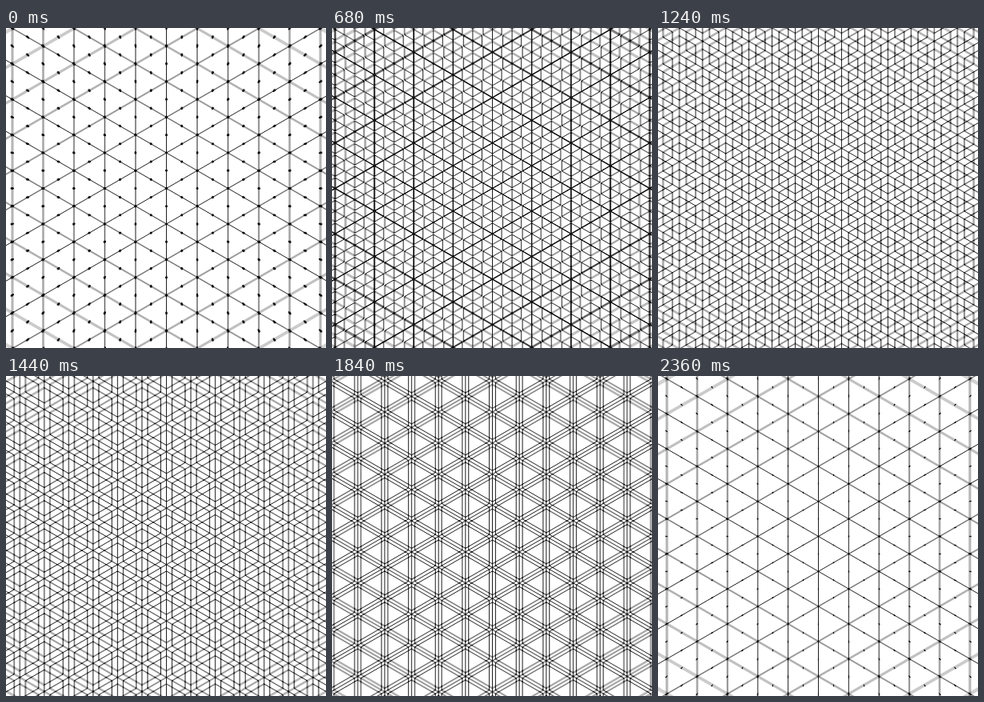
These frames come from a looping animation (400x400 px, 2400 ms). An HTML page with a canvas:

```html
<!DOCTYPE html>
<html lang="en">
<head>
<meta charset="utf-8">
<title>Triangle grid</title>
<style>
  html, body { margin: 0; width: 100%; height: 100%; overflow: hidden; background: #fff; }
  canvas { display: block; }
</style>
</head>
<body>
<canvas id="stage" width="400" height="400"></canvas>
<script>
const SIZE = 400, LOOP = 2400, STEPS = 60;
const CENTER = SIZE / 2 + 0.5;    // on a pixel centre, so the middle line is crisp
const EDGE = 43.42;               // grid edge at the start of the loop
const SAMPLES = 8, SHUTTER = 1;   // motion blur
const SHADE = 28;                 // darkness added by one sample
const H = Math.sqrt(3) / 2;
const stage = document.getElementById('stage').getContext('2d');
const cache = [];

// Directions of the spokes: pointy-top hexagon corners
const dirs = Array.from({ length: 6 }, (_, i) => {
  const a = Math.PI / 2 + i * Math.PI / 3;
  return [Math.cos(a), Math.sin(a)];
});

// Three families of parallel lines, `edge` being the triangle side
function addGrid(c, edge) {
  const gap = edge * H, far = 300, n = Math.ceil(far / gap);
  for (const [dx, dy] of dirs.slice(0, 3)) {
    for (let i = -n; i <= n; i++) {
      const x = -dy * i * gap, y = dx * i * gap;
      c.moveTo(x - dx * far, y - dy * far);
      c.lineTo(x + dx * far, y + dy * far);
    }
  }
}

function addHexagon(c, x, y, r, spokes) {
  dirs.forEach(([dx, dy], i) => c[i ? 'lineTo' : 'moveTo'](x + dx * r, y + dy * r));
  c.closePath();
  if (!spokes) return;
  for (const [dx, dy] of dirs.slice(0, 3)) {
    c.moveTo(x - dx * r, y - dy * r);
    c.lineTo(x + dx * r, y + dy * r);
  }
}

// Hexagons grow on every corner and edge middle until they form the next grid
function addScene(c, p) {
  const d = EDGE * (1 + p) / 2, r = EDGE * p;
  const joined = r >= d / 2;
  addGrid(c, joined ? d : 2 * d);
  if (r < 0.01) return;
  const reach = SIZE / 2 + r + 2;
  const cols = Math.ceil(reach / (d * H)), rows = Math.ceil(reach / d);
  for (let i = -cols; i <= cols; i++) {
    const shift = i % 2 ? 0.5 : 0;
    for (let j = -rows; j <= rows; j++) {
      addHexagon(c, i * d * H, (j + shift) * d, r, !joined);
    }
  }
}

function render(step) {
  const canvas = document.createElement('canvas');
  canvas.width = canvas.height = SIZE;
  const c = canvas.getContext('2d');
  c.fillStyle = '#fff';
  c.fillRect(0, 0, SIZE, SIZE);
  c.translate(CENTER, CENTER);
  c.globalCompositeOperation = 'difference'; // subtracts an equal share per sample
  c.strokeStyle = `rgb(${SHADE}, ${SHADE}, ${SHADE})`;
  c.lineWidth = 1;
  c.lineJoin = 'round';
  for (let s = 0; s < SAMPLES; s++) {
    c.beginPath();
    addScene(c, ((step + 1 + s * SHUTTER / SAMPLES) / STEPS) % 1);
    c.stroke();
  }
  return canvas;
}

function draw() {
  const step = Math.floor((performance.now() % LOOP) / (LOOP / STEPS));
  cache[step] = cache[step] || render(step);
  stage.drawImage(cache[step], 0, 0);
  requestAnimationFrame(draw);
}
draw();
</script>
</body>
</html>
```
